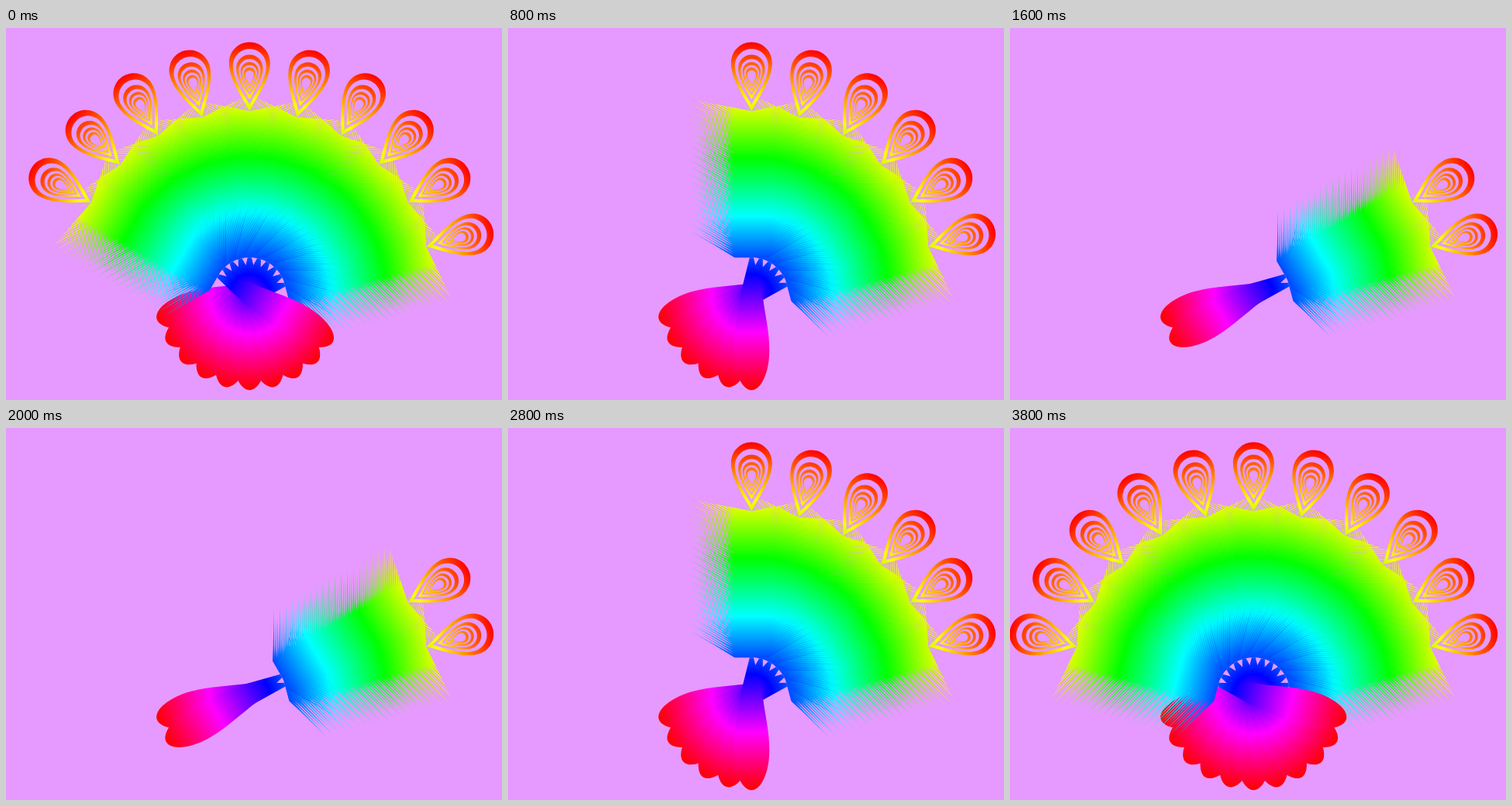
An HTML page with a canvas that plays this animation: 640x480 px, repeating every 4200 ms.

```html
<!DOCTYPE html>
<html lang="en">
<head>
<meta charset="utf-8">
<title>Feather fan</title>
<style>
html, body { margin: 0; height: 100%; overflow: hidden; background: #e699ff; }
canvas { display: block; }
</style>
</head>
<body>
<canvas id="stage" width="640" height="480"></canvas>
<script>
const ctx = document.getElementById('stage').getContext('2d');
const STEP = 200, LOOP = 4200, MOST = 11;
const TAIL = -124, TOP = 325;

// A feather lies along the x axis, with its pivot at the origin.
const rainbow = ctx.createLinearGradient(TAIL, 0, TOP, 0);
['#f00', '#f0f', '#00f', '#0ff', '#0f0', '#ff0', '#f00']
  .forEach((color, i) => rainbow.addColorStop(i / 6, color));

const petal = new Path2D(`M47-2.5 L3-13.5 C-25-17-48-23-72-23 C-102-23-124-12 ${TAIL} 0
  C-124 12-102 23-72 23 C-48 23-25 17 3 13.5 L47 2.5Z`);

function makeEye() {
  const drop = new Path2D(`M236 0 C252 8 276 26.5 298 26.5 C313 26.5 325 15 ${TOP} 0
    C325-15 313-26.5 298-26.5 C276-26.5 252-8 236 0Z`);
  const eye = new Path2D();
  for (const s of [1, .81, .65, .53, .44, .36, .29, .21])
    eye.addPath(drop, new DOMMatrix([s, 0, 0, s, 279 * (1 - s), 0]));
  return eye;
}

// Barbs lean 60 degrees from the shaft and thin out quickly; every third is longest.
function makeVane() {
  const vane = new Path2D(), gap = 3.05, half = gap;
  for (let i = 0, x = 36; x < 238; i++, x += gap) {
    const reach = i % 3 ? 68 : 79, lean = reach * Math.tan(Math.PI / 6);
    for (const side of [-1, 1]) {
      const y = side * reach;
      vane.moveTo(x - half, 0);
      vane.quadraticCurveTo(x + lean / 2, y / 2, x + lean, y);
      vane.quadraticCurveTo(x + lean / 2, y / 2, x + half, 0);
      vane.closePath();
    }
  }
  return vane;
}

const eye = makeEye(), vane = makeVane();
const vaneBounds = new Path2D('M47-90 L254-90 L236 0 L254 90 L47 90Z');

function drawFeather(angle) {
  ctx.save();
  ctx.translate(314.3, 343.3);
  ctx.rotate(-angle * Math.PI / 180);
  ctx.fillStyle = rainbow;
  ctx.fill(petal);
  ctx.fill(eye, 'evenodd');
  ctx.clip(vaneBounds);
  ctx.fill(vane);
  ctx.restore();
}

function draw(now) {
  const tick = Math.floor(now % LOOP / STEP);
  const count = Math.min(MOST, 1 + Math.abs(tick - 9));
  ctx.fillStyle = '#e699ff';
  ctx.fillRect(0, 0, 640, 480);
  for (let i = 1; i <= count; i++) drawFeather(15 * i);
}

const start = performance.now();
function loop() {
  draw(performance.now() - start);
  requestAnimationFrame(loop);
}
loop();
</script>
</body>
</html>
```
